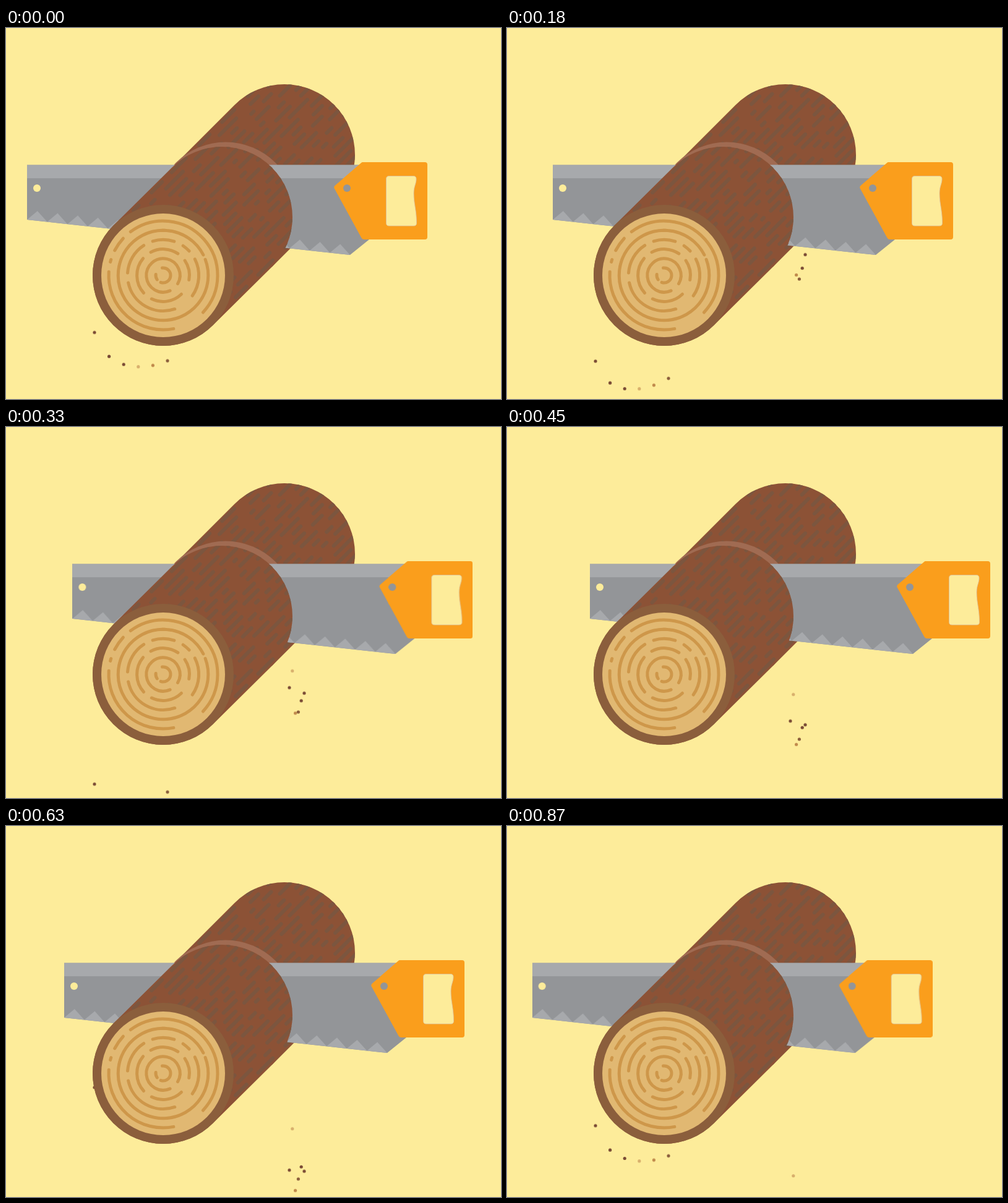
These frames come from a looping animation (800x600 px, 900 ms). An HTML page:

```html
<!DOCTYPE html>
<html lang="en">
<head>
<meta charset="utf-8">
<title>Sawing a log</title>
<style>
  html, body { margin: 0; width: 100%; height: 100%; overflow: hidden; background: #fdec9a; }
  svg { display: block; width: 800px; height: 600px; }
  .saw { animation: saw 900ms infinite steps(15); }
  .chip { animation: fall 900ms infinite steps(30); }
  @keyframes saw {
    0%, 100% { transform: translateX(0); }
    50% { transform: translateX(100px); }
  }
  @keyframes fall {
    from { transform: translateY(0); }
    to { transform: translateY(var(--drop)); }
  }
  .bark { stroke: #7c563f; stroke-width: 6; stroke-linecap: round; }
  .rings { fill: none; stroke: #ce974a; stroke-width: 5; stroke-linecap: round; }
</style>
</head>
<body>
<svg viewBox="0 0 800 600">
  <defs>
    <!-- Arc radii of 1 scale up to exact half circles -->
    <path id="back" d="M369.4 124.4A1 1 0 0 1 530.6 285.6L429.6 386.6L268.4 225.4Z"/>
    <path id="front" d="M268.4 225.4A1 1 0 0 1 429.6 386.6L334.6 480.6A1 1 0 0 1 173.4 319.4Z"/>
    <clipPath id="backClip"><use href="#back"/></clipPath>
    <clipPath id="frontClip"><use href="#front"/></clipPath>
    <clipPath id="cutClip"><path d="M240 170H480V260H240Z"/></clipPath>
    <path id="bark" class="bark" transform="translate(254 400) rotate(-45)"/>
  </defs>

  <g id="chips"></g>

  <use href="#back" fill="#8c5236"/>
  <g clip-path="url(#backClip)"><use href="#bark"/></g>
  <circle cx="355" cy="298.5" r="114" fill="#a06b52" clip-path="url(#cutClip)"/>

  <g class="saw">
    <path fill="#939598" d="M34 221.500H600V342H587L556 367L34 310Z"/>
    <path fill="#a7a9ac" d="M34 221.500H600V243H34Z"/>
    <path id="teeth" fill="#a7a9ac"/>
    <circle cx="50" cy="259" r="6" fill="#fdec9a"/>
    <path fill="#fa9e1c" d="M576 217H677Q681 217 681 221V338Q681 342 677 342H579Q576 342 574.500 339.500L531 260Q529 257 532 254.500L573 219Q575 217 576 217Z"/>
    <path fill="#fdec9a" stroke="#dcc3a4" stroke-width=".8" d="M619 239.500Q614.500 239.500 614.500 244V315.500Q614.500 320 619 320H659Q663.500 320 663.500 315.500C663.500 294 659 285 659 267C659 256 663 252 663 244Q663 239.500 658.500 239.500Z"/>
    <circle cx="551" cy="259" r="6" fill="#939598"/>
  </g>

  <use href="#front" fill="#8c5236"/>
  <g clip-path="url(#frontClip)"><use href="#bark"/></g>
  <circle cx="254" cy="400" r="114" fill="#8b5e3c"/>
  <circle cx="254" cy="400" r="100" fill="#e1b872"/>
  <path id="rings" class="rings"/>
</svg>
<script>
  const $ = id => document.getElementById(id);
  const draw = (id, d) => $(id).setAttribute('d', d);

  let seed = 7;
  function random(min, max) {
    seed = (seed * 16807) % 2147483647;
    return min + (max - min) * seed / 2147483647;
  }

  // Teeth along the sloping lower edge
  const pitch = 522 / 16, slope = 57 / 522;
  let teeth = '';
  for (let i = 0; i < 16; i++) {
    const x = 34 + i * pitch, y = 310 + i * pitch * slope;
    teeth += `M${x} ${y}l${pitch / 2 + 0.5} -14l${pitch / 2 - 0.5} ${14 + pitch * slope}z`;
  }
  draw('teeth', teeth);

  // Broken streaks running along the log
  let bark = '';
  for (let y = -108; y < 114; y += 12) {
    for (let x = random(-20, 20); x < 400; x += random(16, 34)) {
      const length = random(4, 42);
      bark += `M${x} ${y}h${length}`;
      x += length;
    }
  }
  draw('bark', bark);

  // Growth rings, broken at these angles; the first break of each is wide
  const breaks = [[127, 225], [48], [28, 127, 231, 315], [53, 176, 245, 296, 325],
    [351, 118, 227, 316, 333], [61, 189, 202, 228]];
  const point = (r, deg) => {
    const a = deg * Math.PI / 180;
    return `${254 + r * Math.cos(a)} ${400 + r * Math.sin(a)}`;
  };
  let rings = '';
  breaks.forEach((angles, i) => {
    const r = 12 + 15.2 * i, narrow = 8 / r * 180 / Math.PI;
    angles.forEach((angle, j) => {
      const next = angles[(j + 1) % angles.length];
      const start = angle + (j ? narrow : 18);
      const end = next - (j + 1 < angles.length ? narrow : 18);
      const sweep = (end - start + 720) % 360;
      rings += `M${point(r, start)}A${r} ${r} 0 ${sweep > 180 ? 1 : 0} 1 ${point(r, start + sweep)}`;
    });
  });
  draw('rings', rings);

  // Sawdust, falling from either side on alternate strokes
  const dark = '#7a4b35', colours = [dark, '#d8b06d', '#c08a4c', '#8b5e3c', dark, dark];
  function chip(x, y, speed, colour, delay) {
    const el = document.createElementNS('http://www.w3.org/2000/svg', 'circle');
    const attrs = {
      cx: x, cy: y, r: 2.6, fill: colours[colour % 6], class: 'chip',
      style: `--drop:${speed * 900}px;animation-delay:${delay}ms`
    };
    for (const k in attrs) el.setAttribute(k, attrs[k]);
    $('chips').append(el);
  }
  for (let i = 0; i < 6; i++) {
    const x = 143 + 23.6 * i, rim = 400 + Math.sqrt(114 ** 2 - (x - 254) ** 2);
    chip(x, rim - 42, 0.258 - 0.02 * i, i + 4, -420);
    chip(458 + 4.8 * i, 273 + 67 * Math.sin(Math.PI * i / 6) ** 2, 0.38 + 0.07 * Math.cos(3.6 * i), i, 0);
  }
</script>
</body>
</html>
```
